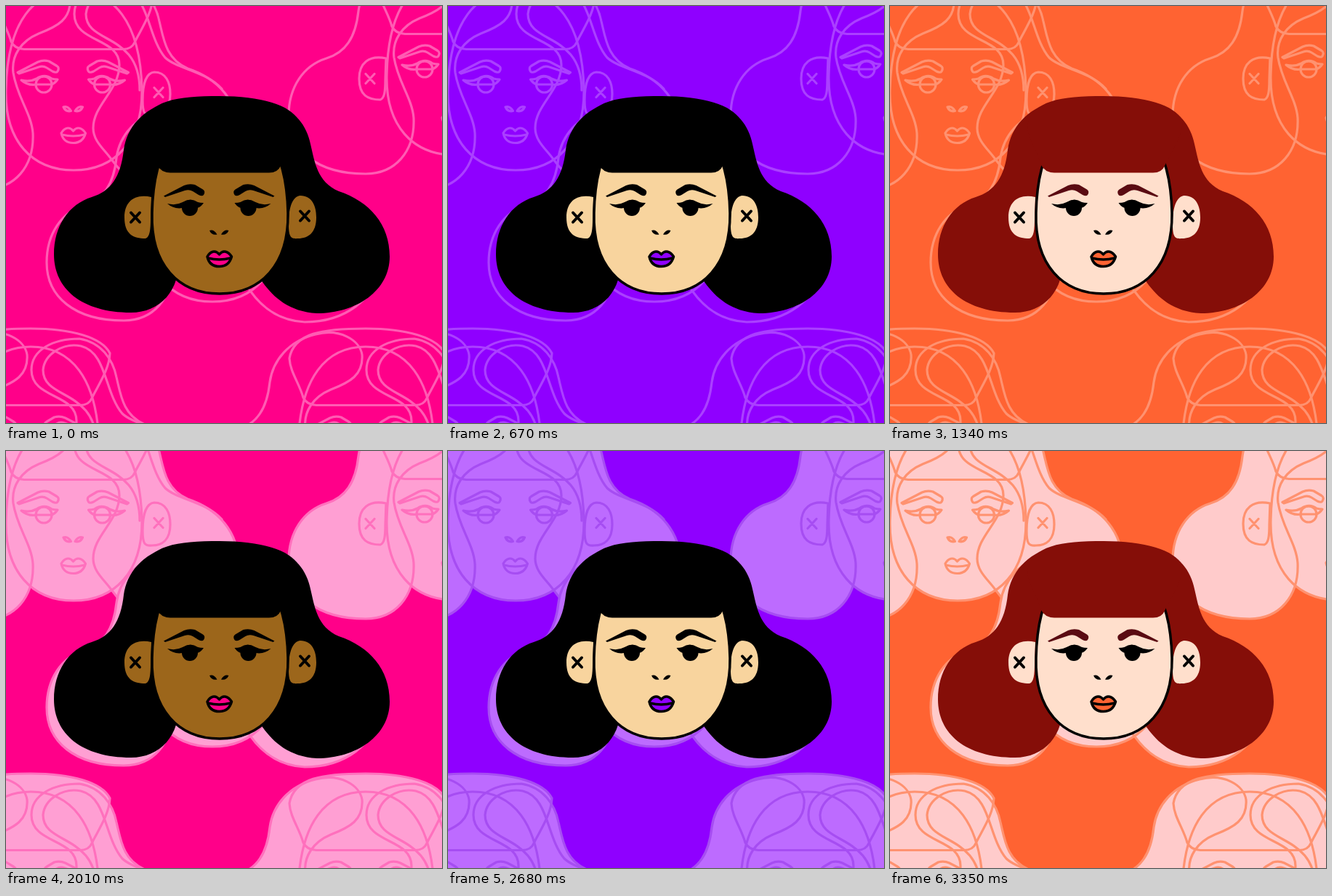
These frames come from a looping animation (600x574 px, 4020 ms). An HTML page with a canvas:

```html
<!DOCTYPE html>
<html lang="en">
<head>
<meta charset="utf-8">
<title>Portrait pattern</title>
<style>
html, body { margin: 0; width: 100%; height: 100%; overflow: hidden; }
canvas { display: block; width: 600px; height: 574px; }
</style>
</head>
<body>
<canvas width="600" height="574"></canvas>
<script>
const ctx = document.querySelector('canvas').getContext('2d');
const STEP = 670;

const path = d => new Path2D(d);
// A path together with its reflection across the middle of the face
const pair = d => {
  const both = path(d);
  both.addPath(path(d), new DOMMatrix([-1, 0, 0, 1, 586.5, 0]));
  return both;
};
const shifted = (p, x, y) => {
  const copy = new Path2D();
  copy.addPath(p, new DOMMatrix([1, 0, 0, 1, x, y]));
  return copy;
};
const cross = (x, y) => `M${x - 6} ${y - 6.5}l12 13m0 -13l-12 13`;

const leftCurl = path(`M289 160C286 140 258 123 225 132C188 141 166 168 162 198
  C158 235 144 255 118 263C86 273 66 303 66 342C66 389 104 422 172 422
  C212 422 240 392 238 345C236 318 216 295 211 262C208 238 222 218 246 208
  C272 198 291 188 289 160Z`);
const rightCurl = path(`M302 180C302 152 332 137 368 137C398 142 414 165 419 190
  C425 215 428 242 458 255C500 269 528 300 528 345C528 392 482 423 428 423
  C390 421 368 401 353 380C343 366 328 355 328 337C328 305 364 285 364 250
  C364 212 302 220 302 180Z`);
const strand = path(`M388 285C388 205 314 222 314 180C316 158 342 142 366 147
  C402 156 398 210 423 240C440 256 478 258 501 283`);
const bangs = path(`M189 165C195 130 235 124 294 124C350 124 392 136 403 158
  C402 180 388 200 378 220Q374 229.5 362 229.5H226Q213 229 208 219
  C203 200 190 184 189 165Z`);
const face = path(`M294 149C240 149 203 190 201 285C199 356 237 396 294 396
  C351 396 389 356 388 285C386 190 348 149 294 149Z`);
const ears = path(`M200 263C176 258 163 270 163 291C163 314 175 320 192 320
  C198 318 199 308 199 292Z
  M389 300C389 275 395 262 405 261C421 261 427 275 427 291
  C427 312 416 320 402 320C392 321 389 318 389 300Z`);
const crosses = path(cross(178, 291) + cross(411, 289));
const brows = pair(`M217 261.5L245 247Q252 244 260 246L271 252.5
  Q275 255 272 260Q270 262.5 265 260L257 255Q252 252 246 254L219 263Z`);
const lashes = pair(`M222 272Q234 275 243 270Q254 263 264 270Q267 271 272 271
  Q268 277 263 278H243Q231 280 222 272Z`);
const irises = pair('M264 278a11 11 0 1 1 -22 0a11 11 0 1 1 22 0Z');
const nostrils = pair('M280 309Q286 307 290.5 314.5Q283 316 280 309Z');
const lips = path(`M277 345C281 338 288 335 293.500 342C299 335 306 338 310.500 345
  C308 354 302 358.500 293.500 358.500C285 358.500 279 354 277 345Z`);
const mouth = path('M278 347Q293.500 351 309 347');

// The outlined heads wear their right curl slightly closer to the face
const ghostCurl = shifted(rightCurl, -7, 1);
const silhouette = [leftCurl, ghostCurl, bangs, ears, face];
const outline = [...silhouette, shifted(strand, -3, 1), crosses, brows,
  lashes, irises, nostrils, lips, mouth];

const looks = [
  { bg: '#ff0089', skin: '#9c661b', hair: '#000', brow: '#000',
    line: '#ff5cb3', ghost: '#ff9fd3', ghostLine: '#ff70bd' },
  { bg: '#8f00ff', skin: '#f8d49e', hair: '#000', brow: '#000',
    line: '#aa40ff', ghost: '#bd6bff', ghostLine: '#a64df2' },
  { bg: '#ff6332', skin: '#ffdfcc', hair: '#850e08', brow: '#5a0b12',
    line: '#ff9270', ghost: '#ffcbcb', ghostLine: '#ff9270' }
];

function fill(color, ...paths) {
  ctx.fillStyle = color;
  paths.forEach(p => ctx.fill(p));
}

function stroke(color, width, ...paths) {
  ctx.strokeStyle = color;
  ctx.lineWidth = width;
  paths.forEach(p => ctx.stroke(p));
}

function drawGhost(look, filled, x, y) {
  ctx.save();
  ctx.translate(x, y);
  if (filled) fill(look.ghost, ...silhouette);
  stroke(filled ? look.ghostLine : look.line, 3.2, ...outline);
  ctx.restore();
}

function drawHead(look) {
  fill(look.hair, leftCurl, rightCurl);
  fill(look.skin, ears, face);
  stroke('#000', 3.5, face);
  stroke('#000', 4, crosses);
  fill(look.hair, bangs);
  fill('#000', lashes, irises, nostrils);
  fill(look.brow, brows);
  fill(look.bg, lips);
  stroke('#000', 3.5, lips, mouth);
}

function draw(now) {
  const step = Math.floor(now / STEP) % 6;
  const look = looks[step % 3];
  const filled = step > 2;
  ctx.lineCap = ctx.lineJoin = 'round';
  ctx.fillStyle = look.bg;
  ctx.fillRect(0, 0, 600, 574);
  const places = [[-201, filled ? -190 : -170], [323, -191], [-260, 320], [201, 320], [-10, 11]];
  places.forEach(([x, y]) => drawGhost(look, filled, x, y));
  drawHead(look);
}

const start = performance.now();
function tick() {
  draw(performance.now() - start);
  requestAnimationFrame(tick);
}
tick();
</script>
</body>
</html>
```
